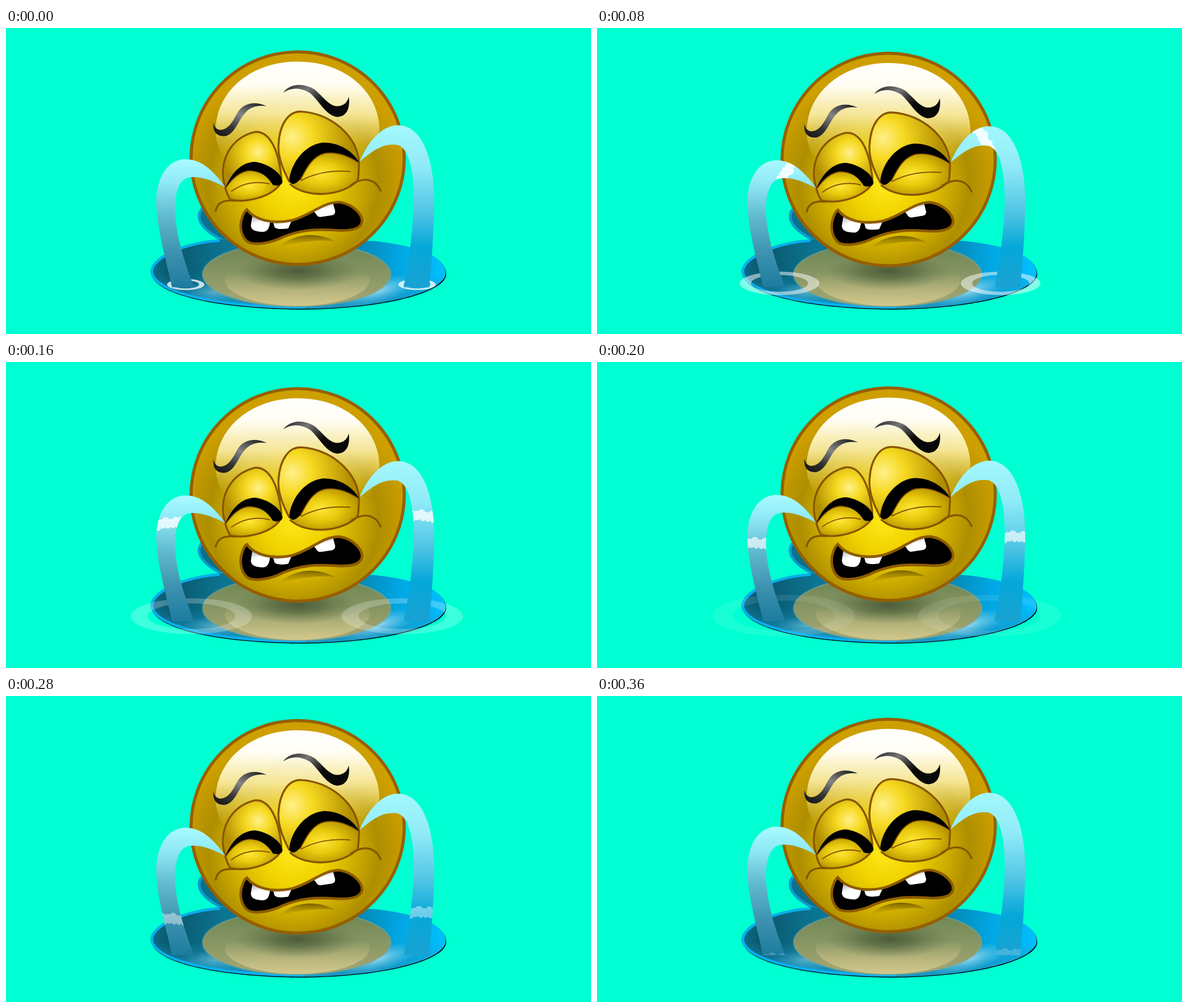
Animation of 1033 by 542 pixels, one loop 400 ms. Source, as an HTML page:

```html
<!DOCTYPE html>
<html lang="en">
<head>
<meta charset="utf-8">
<title>Crying face</title>
<style>
html, body { margin: 0; width: 100%; height: 100%; overflow: hidden; background: #00ffd2; }
svg { display: block; width: 100vw; height: 100vh; }
.line { fill: none; stroke: #875600; stroke-width: 3.4; stroke-linecap: round; stroke-linejoin: round; }
</style>
</head>
<body>
<svg viewBox="0.7 0.7 1033 542" preserveAspectRatio="none">
<defs>
  <linearGradient id="water" gradientUnits="userSpaceOnUse" x1="256" y1="0" x2="777" y2="0">
    <stop offset="0" stop-color="#0a6f8c"/><stop offset=".07" stop-color="#0a566a"/>
    <stop offset=".25" stop-color="#0b7594"/><stop offset=".65" stop-color="#067ba3"/>
    <stop offset=".85" stop-color="#00a8e4"/><stop offset="1" stop-color="#00c0ff"/>
  </linearGradient>
  <linearGradient id="shore" x1="0" y1="0" x2="0" y2="1">
    <stop offset=".5" stop-color="#1a98c4" stop-opacity="0"/><stop offset="1" stop-color="#1a98c4"/>
  </linearGradient>
  <linearGradient id="sand" x1="0" y1="0" x2="0" y2="1">
    <stop offset="0" stop-color="#6b8350"/><stop offset=".5" stop-color="#879664"/><stop offset="1" stop-color="#a9a873"/>
  </linearGradient>
  <linearGradient id="pale" x1="0" y1="0" x2="0" y2="1">
    <stop offset=".35" stop-color="#d5cb8c" stop-opacity="0"/><stop offset="1" stop-color="#d8cd90" stop-opacity=".85"/>
  </linearGradient>
  <radialGradient id="glow">
    <stop offset="0" stop-color="#d8f6ff" stop-opacity=".7"/><stop offset="1" stop-color="#8ce0ff" stop-opacity="0"/>
  </radialGradient>
  <radialGradient id="shade">
    <stop offset="0" stop-color="#4d5c3a"/><stop offset=".4" stop-color="#56683f" stop-opacity=".75"/>
    <stop offset="1" stop-color="#66784a" stop-opacity="0"/>
  </radialGradient>
  <radialGradient id="skin" cx=".48" cy=".62" r=".54">
    <stop offset="0" stop-color="#ffe81a"/><stop offset=".28" stop-color="#f0d300"/>
    <stop offset=".55" stop-color="#cdac00"/><stop offset=".74" stop-color="#ae8e00"/><stop offset="1" stop-color="#cd9f00"/>
  </radialGradient>
  <linearGradient id="shine" x1="0" y1="0" x2="0" y2="1">
    <stop offset="0" stop-color="#fff"/><stop offset=".22" stop-color="#fffdf2"/>
    <stop offset=".5" stop-color="#fff3b0" stop-opacity=".85"/><stop offset=".92" stop-color="#ffe95a" stop-opacity="0"/>
  </linearGradient>
  <radialGradient id="lidL" gradientUnits="userSpaceOnUse" cx="446" cy="220" r="64">
    <stop offset="0" stop-color="#fff08a"/><stop offset=".35" stop-color="#f6d920"/><stop offset="1" stop-color="#b08c00"/>
  </radialGradient>
  <radialGradient id="lidR" href="#lidL" gradientUnits="userSpaceOnUse" cx="506" cy="193" r="105"/>
  <radialGradient id="bag" cx=".45" cy=".5" r=".55">
    <stop offset="0" stop-color="#ffe838"/><stop offset=".5" stop-color="#e8c90c"/><stop offset="1" stop-color="#b89500"/>
  </radialGradient>
  <linearGradient id="browL" x1="0" y1="1" x2="1" y2="0">
    <stop offset="0" stop-color="#111"/><stop offset=".3" stop-color="#333"/>
    <stop offset=".58" stop-color="#858585"/><stop offset="1" stop-color="#111"/>
  </linearGradient>
  <linearGradient id="browR" x1="0" y1="0" x2="1" y2=".5">
    <stop offset="0" stop-color="#222"/><stop offset=".35" stop-color="#777"/><stop offset=".7" stop-color="#080808"/>
  </linearGradient>
  <linearGradient id="chin" x1="0" y1="0" x2="0" y2="1">
    <stop offset="0" stop-color="#775f00"/><stop offset="1" stop-color="#b89800" stop-opacity=".2"/>
  </linearGradient>
  <linearGradient id="tooth" x1="0" y1="0" x2=".3" y2="1">
    <stop offset=".1" stop-color="#b5b5b5"/><stop offset=".55" stop-color="#fff"/>
  </linearGradient>
  <linearGradient id="flowL" x1="0" y1="0" x2="0" y2="1">
    <stop offset="0" stop-color="#a9fbff"/><stop offset=".18" stop-color="#8fe9f6"/>
    <stop offset=".45" stop-color="#5fb9ce"/><stop offset=".75" stop-color="#3a90ad"/><stop offset="1" stop-color="#1c7c9f"/>
  </linearGradient>
  <linearGradient id="flowR" x1="0" y1="0" x2="0" y2="1">
    <stop offset="0" stop-color="#a4f8fc"/><stop offset=".25" stop-color="#90ebf8"/>
    <stop offset=".55" stop-color="#4cc3e4"/><stop offset=".75" stop-color="#04a8d9"/><stop offset="1" stop-color="#1aa2d2"/>
  </linearGradient>
  <path id="pool" d="M378 375C315 379 256 406 256 432C258 473 380 498 530 498C672 496 777 467 777 435C776 405 730 387 650 378Z"/>
  <path id="tearL" d="M388 282C365 250 345 232 316 232C285 234 266 265 266 310C268 360 283 410 294 460L333 460C318 420 300 370 299 320C300 285 308 265 328 264C350 263 370 273 388 282Z"/>
  <path id="tearR" d="M625 237C640 200 665 172 693 172C735 172 757 230 757 310C756 360 753 410 748 460L703 460C710 420 717 380 720 330C723 270 717 215 692 207C665 203 645 220 625 237Z"/>
  <path id="mouth" d="M426 322C440 340 470 348 505 341C540 332 560 308 590 309C615 313 632 332 629 345C625 358 605 360 580 358C545 356 520 358 490 370C470 380 445 385 430 380C415 372 412 350 418 335C420 328 422 325 426 322Z"/>
  <clipPath id="clipL"><use href="#tearL"/></clipPath>
  <clipPath id="clipR"><use href="#tearR"/></clipPath>
  <clipPath id="clipM"><use href="#mouth"/></clipPath>
  <clipPath id="clipP"><use href="#pool"/></clipPath>
  <g id="foam" fill="#fff"></g>
</defs>

<path d="M350 316C333 326 331 354 382 378L425 375L385 325Z" fill="#0b9ccd"/>
<path d="M352 320C338 332 340 352 384 374L425 375L385 325Z" fill="#0a718d"/>
<use href="#pool" x="1" y="1.5"/>
<use href="#pool" fill="url(#water)"/>
<g clip-path="url(#clipP)">
  <use href="#pool" fill="url(#shore)"/>
  <ellipse cx="655" cy="466" rx="75" ry="22" fill="url(#glow)" transform="rotate(-14 655 466)"/>
  <ellipse cx="370" cy="468" rx="55" ry="18" fill="url(#glow)" opacity=".5"/>
  <path d="M378 375C315 379 256 406 256 432C258 473 380 498 530 498" fill="none" stroke="#06b0ee" stroke-width="9"/>
</g>
<ellipse cx="514" cy="437" rx="166" ry="57" fill="url(#sand)" stroke="#7fa58f" stroke-opacity=".5" stroke-width="3"/>
<ellipse cx="515" cy="447" rx="128" ry="46" fill="url(#pale)"/>
<ellipse cx="516" cy="431" rx="110" ry="34" fill="url(#shade)"/>

<g fill="none" stroke="#fff"><ellipse id="ringL"/><ellipse id="ringR"/></g>

<g id="face">
  <circle cx="515.7" cy="230" r="188.2" fill="url(#skin)" stroke="#965f00" stroke-width="5.4"/>
  <path d="M371 180C371 115 430 59 516 59C602 59 660 115 660 180C657 208 645 232 625 245L395 240C380 225 371 205 371 180Z" fill="url(#shine)"/>
  <path d="M461 138C440 128 418 132 408 152C398 172 390 180 378 180C371 179 368 172 367 167C365 185 375 192 388 191C405 187 410 165 422 151C432 138 448 136 461 138Z" fill="url(#browL)"/>
  <path d="M490 114C502 98 525 96 545 108C560 120 570 137 585 138C598 138 604 130 606 121C609 145 600 157 585 157C565 154 555 130 538 115C520 104 505 105 490 114Z" fill="url(#browR)"/>
</g>

<g id="eyes">
  <g class="line">
    <path d="M388 282C374 240 395 195 440 184C466 182 482 215 487 265L480 281Z" style="fill:url(#lidL)"/>
    <path d="M501 272C489 250 480 225 482 205C484 170 500 146 523 148C575 152 620 190 624 237Z" style="fill:url(#lidR)"/>
    <path d="M388 283C391 295 394 300 397 304C425 310 465 300 483 279C470 262 450 252 430 252C412 254 400 266 388 283" style="fill:url(#bag)"/>
    <path d="M503 277C530 301 592 300 622 270Q624 255 624 238C600 222 580 219 565 221C540 226 530 250 520 268" style="fill:url(#bag)"/>
    <path d="M399 289C420 273 445 271 466 276M522 270C550 255 580 252 608 254" stroke-width="2"/>
    <path d="M371 324C374 308 387 304 404 306M610 278C630 264 652 265 662 288"/>
  </g>
  <path d="M388 283C398 258 415 238 440 237C465 240 488 258 489 272C488 280 480 280 472 278C462 262 450 253 430 252C412 254 400 266 388 283Z"/>
  <path d="M624 238C600 222 580 219 565 221C540 226 530 250 520 268C512 278 503 279 501 270C502 245 525 207 560 203C590 202 615 220 624 238Z"/>
</g>

<g id="jaw">
  <path d="M484 387C505 367 545 358 583 378C560 374 520 378 484 387Z" fill="url(#chin)"/>
  <use href="#mouth"/>
  <g clip-path="url(#clipM)" fill="url(#tooth)">
    <path d="M436 331L467 342C466 358 460 362 452 361C440 360 434 358 433 350Z"/>
    <path d="M472 343L506 340L499 355Q480 358 475 353Z"/>
    <path d="M542 322L578 310L582 325Q582 331 576 332L556 335Q551 335 549 331Z"/>
  </g>
  <use href="#mouth" fill="none" stroke="#8d5c00" stroke-width="4.6"/>
</g>

<g id="streamL">
  <use href="#tearL" fill="url(#flowL)"/>
  <g clip-path="url(#clipL)"><use id="foamL" href="#foam"/></g>
</g>
<g id="streamR">
  <use href="#tearR" fill="url(#flowR)"/>
  <g clip-path="url(#clipR)"><use id="foamR" href="#foam"/></g>
</g>
</svg>
<script>
const $ = id => document.getElementById(id);
const set = (id, attrs) => {
  for (const name in attrs) $(id).setAttribute(name, attrs[name]);
};

// Two rows of bubbles spanning a stream
let bubbles = '<rect x="-24" y="-6" width="48" height="12"/>';
for (let i = 0; i < 6; i++) {
  const x = -22 + i * 9;
  const r = 5 + i % 3;
  bubbles += `<circle cx="${x}" cy="${-5 + i % 2 * 2}" r="${r}"/>`;
  bubbles += `<circle cx="${x + 3}" cy="${5 - i % 2 * 2}" r="${11 - r}"/>`;
}
$('foam').innerHTML = bubbles;

// Foam position and angle for each step after the first
const foamL = [[365, 262, 115], [335, 252, 120], [286, 255, -35], [287, 283, -6], [283, 320, 2],
  [290, 358, 3], [299, 396, 4], [310, 433, 5], [314, 467, 0]];
const foamR = [[650, 206, 50], [682, 193, 60], [727, 223, 25], [738, 271, 5], [739, 309, 0],
  [738, 347, 0], [734, 384, 0], [730, 421, 0], [725, 459, 0]];

function drawFoam(id, path, k) {
  const [x, y, angle] = path[Math.max(k - 1, 0)];
  set(id, {
    transform: `translate(${x} ${y}) rotate(${angle})`,
    opacity: k ? Math.min(.85, 1.25 - k * .118) : 0
  });
}

function drawRing(id, cx, k) {
  const rx = 33 + 18.6 * k;
  set(id, {
    rx: rx * .86, ry: rx * .86,
    'stroke-width': rx * .28,
    transform: `translate(${cx} ${455 - k}) scale(1 .295)`,
    opacity: k < 6 ? .77 - .135 * k : 0
  });
}

function draw(now) {
  const k = Math.floor(now / 40) % 10;
  const dip = 1 - Math.abs(k - 4) / 5;
  const squash = (y, s) => `translate(0 ${y}) scale(1 ${s}) translate(0 ${-y})`;
  set('face', { transform: `translate(0 ${6 * dip})` });
  set('eyes', { transform: `translate(0 ${4 * dip})` });
  set('jaw', { transform: squash(285, 1 + .045 * dip) });
  set('streamL', { transform: squash(460, 1 - .022 * dip) });
  set('streamR', { transform: squash(460, 1 - .015 * dip) });
  drawRing('ringL', 318 + 2.5 * k, k);
  drawRing('ringR', 726.5 - 6.5 * k, k);
  drawFoam('foamL', foamL, k);
  drawFoam('foamR', foamR, k);
  requestAnimationFrame(draw);
}
draw(0);
</script>
</body>
</html>
```
